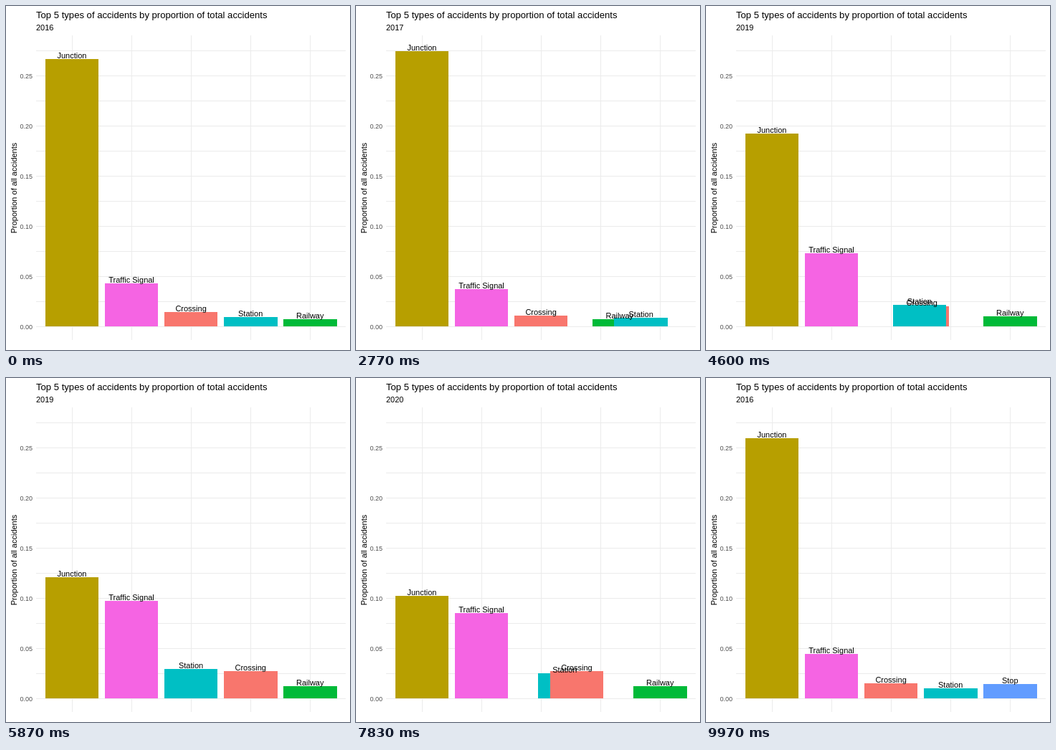
These frames come from a looping animation (480x480 px, 10000 ms). An HTML page with a canvas:

```html
<!DOCTYPE html>
<html lang="en">
<head>
<meta charset="utf-8">
<title>Top 5 types of accidents</title>
<style>
  html, body { margin: 0; width: 100%; height: 100%; overflow: hidden; background: #fff; }
  canvas { display: block; width: 480px; height: 480px; }
</style>
</head>
<body>
<canvas id="chart" width="480" height="480"></canvas>
<script>
const ctx = document.getElementById('chart').getContext('2d');
const LOOP = 10000, STEPS = 300, STEPS_PER_YEAR = 50, HOLD = 25;
const PANEL = { left: 42, right: 474, top: 41, bottom: 466 };
const BASE = 447, BAR_HALF = 37.38;

const COLORS = {
  Crossing: '#F8766D', Junction: '#B79F00', Railway: '#00BA38',
  Station: '#00BFC4', Stop: '#619CFF', 'Traffic Signal': '#F564E3'
};

// Bars of each year in rank order, with the y of their top edge.
const YEARS = [
  { Junction: 74, 'Traffic Signal': 387, Crossing: 427, Station: 434, Railway: 437 },
  { Junction: 60, 'Traffic Signal': 401, Crossing: 433, Railway: 437, Station: 437 },
  { Junction: 70, 'Traffic Signal': 382, Crossing: 429, Station: 430, Railway: 436 },
  { Junction: 277.6, 'Traffic Signal': 310.8, Station: 405.9, Crossing: 408.9, Railway: 430 },
  { Junction: 287.9, 'Traffic Signal': 317.1, Station: 409.1, Crossing: 410.9, Railway: 430 },
  { Junction: 328.2, 'Traffic Signal': 344.3, Crossing: 406.2, Station: 416.3, Stop: 427 }
];

const slotX = rank => 91.95 + 83.07 * rank;
const mix = (a, b, p) => a + (b - a) * p;

function rect(x0, y0, x1, y1, color) {
  ctx.fillStyle = color;
  ctx.fillRect(x0, y0, x1 - x0, y1 - y0);
}

function text(str, x, y, size, align = 'left', color = '#000') {
  ctx.font = `${size}px "Liberation Sans", Arial, sans-serif`;
  ctx.textAlign = align;
  ctx.fillStyle = color;
  ctx.fillText(str, x, y);
}

function drawAxes(year) {
  rect(0, 0, 480, 480, '#fff');
  for (let i = 0; i < 12; i++) {
    const y = BASE - 35 * i;
    rect(PANEL.left, y, PANEL.right, y + 1, '#EBEBEB');
    if (i % 2 === 0) text((i * 0.025).toFixed(2), 37, y + 4, 9, 'right', '#4D4D4D');
  }
  for (let i = 0; i < 5; i++) {
    const x = Math.round(slotX(i));
    rect(x, PANEL.top, x + 1, PANEL.bottom, '#EBEBEB');
  }
  text('Top 5 types of accidents by proportion of total accidents', 42, 17, 13.1);
  text(year, 42, 34, 11);
  ctx.save();
  ctx.translate(15, 254);
  ctx.rotate(-Math.PI / 2);
  text('Proportion of all accidents', 0, 0, 11, 'center');
  ctx.restore();
}

// Bars missing from the next year stay put until the transition ends.
function barsAt(from, to, p) {
  const nextRanks = Object.keys(to);
  return Object.entries(from).map(([name, top], rank) => {
    const stays = name in to;
    return {
      name,
      x: slotX(stays ? mix(rank, nextRanks.indexOf(name), p) : rank),
      top: Math.round(stays ? mix(top, to[name], p) : top)
    };
  });
}

function draw(ms) {
  const step = Math.floor((ms % LOOP) * STEPS / LOOP + 0.1) % STEPS;
  const index = Math.floor(step / STEPS_PER_YEAR);
  const next = (index + 1) % YEARS.length;
  const p = Math.max(0, step % STEPS_PER_YEAR - HOLD) / (STEPS_PER_YEAR - HOLD);
  const bars = barsAt(YEARS[index], YEARS[next], p);

  drawAxes(2016 + (p < 0.5 ? index : next));
  for (const { name, x, top } of bars) {
    rect(Math.round(x - BAR_HALF), top, Math.round(x + BAR_HALF), BASE, COLORS[name]);
  }
  for (const { name, x, top } of bars) text(name, x, top - 1, 11, 'center');
}

const start = performance.now();
function tick() {
  draw(performance.now() - start);
  requestAnimationFrame(tick);
}
tick();
</script>
</body>
</html>
```
